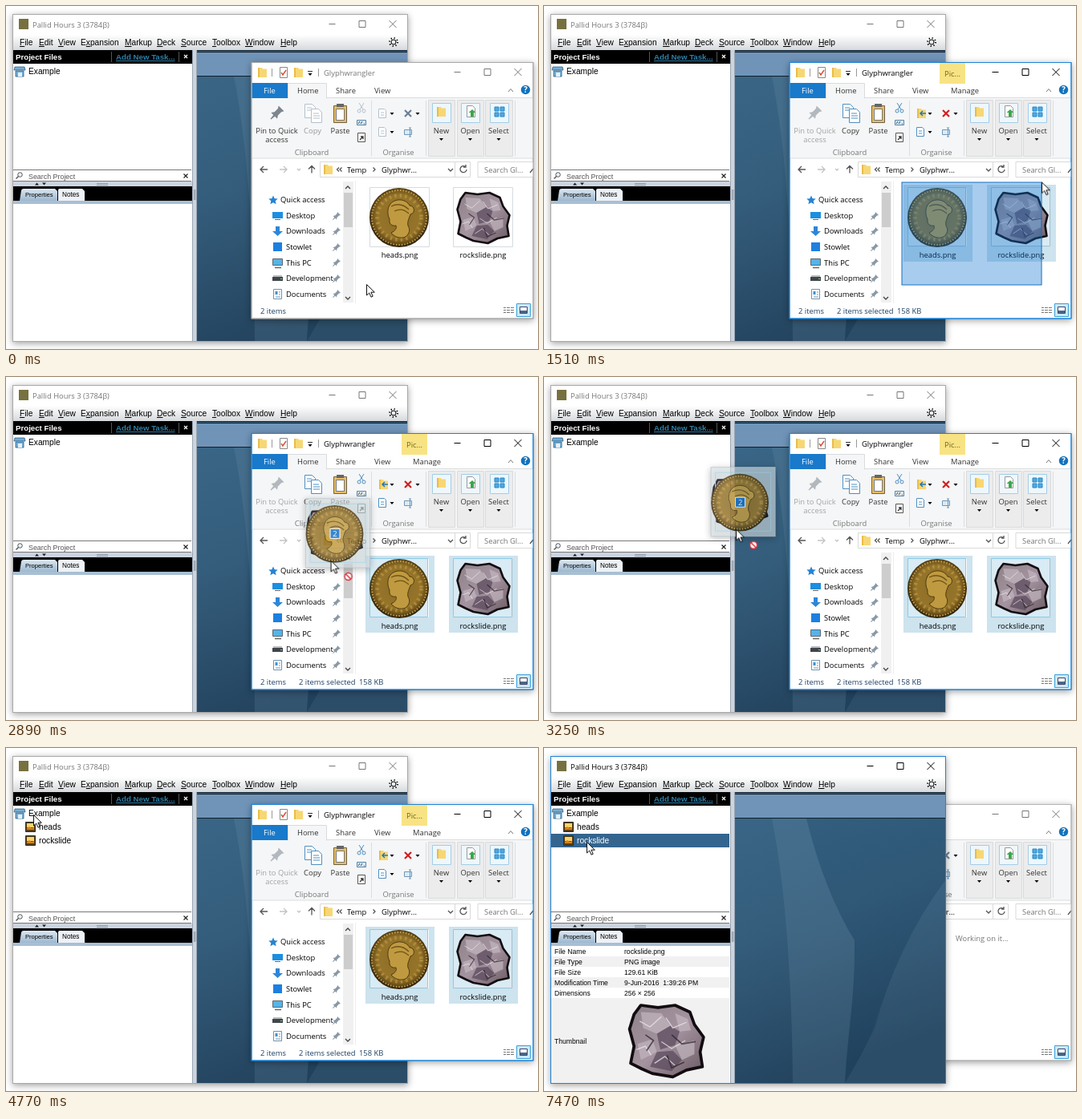
An HTML page for the animation above (8000 ms loop, 663 by 428 pixels).

```html
<!DOCTYPE html>
<html lang="en">
<head>
<meta charset="utf-8">
<title>Dragging files into a project</title>
<style>
html, body { margin: 0; width: 100%; height: 100%; overflow: hidden; background: #fff; }
svg { position: absolute; left: 0; top: 0; width: 663px; height: 428px; }
text { fill: currentColor; white-space: pre; }
.ui { font: 9.4px "Open Sans", "Noto Sans", sans-serif; }
.app { font: 10.2px "Liberation Sans", Arial, sans-serif; }
.bold { font-weight: bold; font-size: 9.7px; }
.small { font-size: 8.6px; }
.mid { text-anchor: middle; }
.line { fill: none; stroke: currentColor; }
.shadow { filter: drop-shadow(0 2px 4px rgba(0,0,0,.38)); }

/* one loop = 8 s, so 1% = 80 ms */
#app { z-index: 1; }
#explorer { z-index: 2; animation: depth 8s step-end infinite; }
#pointer { z-index: 3; }
@keyframes depth { 0% { z-index: 2 } 70% { z-index: 0 } }

.app-ink, .app-edge, .exp-ink, .exp-edge, .pre, .picked, .tab, .one, .two, .heads-on, .rock-on,
.list, .busy, .drop, .added, .row1, .row2, .info1, .info2, .ghost, .no { animation: 8s step-end infinite; }

.app-ink { animation-name: app-ink }
.app-edge { animation-name: app-edge }
.exp-ink { animation-name: exp-ink }
.exp-edge { animation-name: exp-edge }
@keyframes app-ink { 0% { color: #777 } 70% { color: #000 } }
@keyframes app-edge { 0% { stroke: #a9a9a9 } 70% { stroke: #1b84d8 } }
@keyframes exp-ink { 0% { color: #777 } 2.5% { color: #000 } 70% { color: #777 } }
@keyframes exp-edge { 0% { stroke: #a9a9a9 } 2.5% { stroke: #1b84d8 } 70% { stroke: #b4b4b4 } }

.pre { animation-name: pre }
.picked { animation-name: picked }
.tab { animation-name: tab }
.one { animation-name: one }
.two { animation-name: two }
.heads-on { animation-name: heads-on }
.rock-on { animation-name: two }
.list { animation-name: list }
.busy { animation-name: busy }
.drop { animation-name: drop }
.added { animation-name: added }
.row1 { animation-name: row1 }
.row2 { animation-name: row2 }
.info1 { animation-name: info1 }
.info2 { animation-name: info2 }
.ghost { animation-name: ghost }
.no { animation-name: no }
@keyframes pre { 0% { opacity: 1 } 11% { opacity: 0 } 75.5% { opacity: 1 } }
@keyframes picked { 0% { opacity: 0 } 11% { opacity: 1 } 75.5% { opacity: 0 } }
@keyframes tab { 0% { opacity: 0 } 10.2% { opacity: 1 } 75.5% { opacity: 0 } }
@keyframes one { 0% { opacity: 0 } 11% { opacity: 1 } 14% { opacity: 0 } }
@keyframes two { 0% { opacity: 0 } 14% { opacity: 1 } 70% { opacity: 0 } }
@keyframes heads-on { 0% { opacity: 0 } 9.7% { opacity: 1 } 70% { opacity: 0 } }
@keyframes list { 0% { opacity: 1 } 70% { opacity: 0 } }
@keyframes busy { 0% { opacity: 0 } 70% { opacity: 1 } }
@keyframes drop { 0% { opacity: 0 } 49.2% { opacity: 1 } 59.6% { opacity: 0 } }
@keyframes added { 0% { opacity: 0 } 59.6% { opacity: 1 } }
@keyframes row1 { 0% { opacity: 0 } 78.3% { opacity: 1 } 92.1% { opacity: 0 } }
@keyframes row2 { 0% { opacity: 0 } 92.1% { opacity: 1 } }
@keyframes info1 { 0% { opacity: 0 } 79.2% { opacity: 1 } 93.3% { opacity: 0 } }
@keyframes info2 { 0% { opacity: 0 } 93.3% { opacity: 1 } }
@keyframes ghost { 0% { opacity: 0 } 33.5% { opacity: .84 } 59.6% { opacity: 0 } }
@keyframes no { 0% { opacity: 0 } 33.5% { opacity: 1 } 49.2% { opacity: 0 } }

.band { x: 446px; animation: band 8s linear infinite, band-on 8s step-end infinite; }
@keyframes band-on { 0% { opacity: 0 } 3% { opacity: 1 } 24.7% { opacity: 0 } }
@keyframes band {
  0%, 2.5% { y: 348px; width: 0; height: 0 }
  5.6% { y: 341px; width: 10px; height: 7px }
  10.25% { y: 310px; width: 54px; height: 38px }
  18.875% { y: 220px; width: 174px; height: 128px }
  20.4% { y: 220px; width: 181px; height: 128px }
  22.25%, 100% { y: 220px; width: 197px; height: 128px }
}
#arrow { animation: travel 8s linear infinite; }
@keyframes travel {
  0% { transform: translate(449px,347px) }
  2.5% { transform: translate(446px,347px) }
  5.6% { transform: translate(456px,341px) }
  10.25% { transform: translate(500px,310px) }
  18.875% { transform: translate(620px,219.5px) }
  20.4% { transform: translate(627px,219.5px) }
  22.25% { transform: translate(643px,219.5px) }
  24.5% { transform: translate(643px,220px); animation-timing-function: ease-in-out }
  31.5%, 33.5% { transform: translate(483px,246px) }
  36.125% { transform: translate(405px,229px) }
  43.25% { transform: translate(143px,167px) }
  45.125% { transform: translate(66px,138px); animation-timing-function: ease-out }
  49.625% { transform: translate(34px,83px) }
  65.6% { transform: translate(34px,83px); animation-timing-function: ease-in-out }
  70.2% { transform: translate(139px,123px) }
  72.3% { transform: translate(139px,123px); animation-timing-function: ease-in-out }
  78% { transform: translate(48px,98px) }
  83.6% { transform: translate(48px,98px); animation-timing-function: ease-in-out }
  87.1%, 100% { transform: translate(53px,117px) }
}
</style>
</head>
<body>
<svg id="app" viewBox="0 0 663 428">
  <defs>
    <linearGradient id="sea" x2=".25" y2="1"><stop stop-color="#3b6788"/><stop offset=".5" stop-color="#345d7b"/><stop offset="1" stop-color="#24445f"/></linearGradient>
    <linearGradient id="bar" x2="0" y2="1"><stop stop-color="#fff"/><stop offset="1" stop-color="#d6d9dc"/></linearGradient>
    <linearGradient id="tabFill" x2="0" y2="1"><stop stop-color="#dce7f1"/><stop offset="1" stop-color="#9db8cf"/></linearGradient>
    <radialGradient id="gold" cx=".5" cy=".48"><stop stop-color="#8a6a25"/><stop offset=".72" stop-color="#96752a"/><stop offset=".9" stop-color="#6d5119"/><stop offset="1" stop-color="#33260c"/></radialGradient>
    <linearGradient id="stone" x2="1" y2="1"><stop stop-color="#8e8187"/><stop offset=".5" stop-color="#a493a0"/><stop offset="1" stop-color="#6a5a62"/></linearGradient>
    <g id="coin">
      <circle r="37" fill="url(#gold)"/>
      <circle r="34" fill="none" stroke="#c5a04a" stroke-width="2" stroke-dasharray="1.5 2"/>
      <circle r="27.5" fill="none" stroke="#bf9a45" stroke-width="4.5" stroke-dasharray="2.5 4" opacity=".65"/>
      <path d="M-11-17C-4-25 9-23 13-15C19-15 21-6 14-4C12 2 10 5 11 10C14 15 13 20 8 24C1 27-6 24-10 19C-4 16-3 13-4 10C-9 11-13 8-12 2C-15-4-15-12-11-17Z" fill="#c09a40" stroke="#4e3a12"/>
      <path d="M-10-14Q2-20 12-10M-6-8Q4-13 12-5" fill="none" stroke="#705419" stroke-width="1.3"/>
    </g>
    <g id="rock">
      <path d="M-22-31L-7-29 8-31 21-25 25-14 33-3 30 10 32 23 18 26 6 32-12 29-21 25-31 20-28 5-32-10-28-23Z" fill="url(#stone)" stroke="#120c10" stroke-width="2.6" stroke-linejoin="round"/>
      <path d="M-22-25L-4-24 4-13-8-6-20-11ZM8-24L19-19 22-9 12-8ZM-25 3L-12-1-8 10-22 17ZM8 4L25 0 25 12 14 17Z" fill="#c4b7bf" opacity=".7"/>
      <path d="M-8-6L4-13 12-8 8 4-5 8ZM-8 10L6 9 14 17 5 27-14 23Z" fill="#59485a" opacity=".7"/>
      <path d="M-23-17l9 5 10-9M0-20l6 9 12-5M-26 8l8-3 5 8M-4 1l9 6 12-7M-10 20l9-6 9 8" fill="none" stroke="#f0e9ee" stroke-width=".9" opacity=".75"/>
      <path d="M-18-5l7 5-6 9M5-5l9 8 12-2M1 13l4 11 11-5" fill="none" stroke="#2b2028" stroke-width="1.2" opacity=".7"/>
    </g>
    <g id="image"><path d="M.5.5h12v12H.5z" fill="#57401b" stroke="#2f2c2a"/><path d="M2 2h9v5H2z" fill="#f7d56a"/><path d="M2 8l3-2 3 2 3-1v3H2z" fill="#d9821f"/></g>
    <g id="folder"><path d="M0 1h5l1 1.5h5V13H0z" fill="#f7d774"/><path d="M0 1h2v12H0z" fill="#e9bd48"/></g>
    <g id="caps" class="line"><path d="M0 4.5h8"/><path d="M37.5.5h8v8h-8zM75 0l9 9M84 0l-9 9"/></g>
  </defs>
  <rect class="app-edge shadow" x="8.5" y="10.5" width="492" height="408" fill="#fff"/>
  <rect x="16" y="16" width="12" height="13" fill="#77713f"/>
  <g class="app-ink">
    <text class="ui" x="33" y="27">Pallid Hours 3 (3784β)</text>
    <use href="#caps" x="402.500" y="18"/>
  </g>
  <path d="M9 36h491v19H9z" fill="url(#bar)"/>
  <g class="app" id="menu"><text x="17" y="49"><tspan text-decoration="underline">F</tspan>ile</text><text x="41" y="49"><tspan text-decoration="underline">E</tspan>dit</text><text x="65" y="49"><tspan text-decoration="underline">V</tspan>iew</text><text x="93" y="49">E<tspan text-decoration="underline">x</tspan>pansion</text><text x="148" y="49"><tspan text-decoration="underline">M</tspan>arkup</text><text x="188" y="49"><tspan text-decoration="underline">D</tspan>eck</text><text x="218" y="49"><tspan text-decoration="underline">S</tspan>ource</text><text x="257" y="49"><tspan text-decoration="underline">T</tspan>oolbox</text><text x="298" y="49"><tspan text-decoration="underline">W</tspan>indow</text><text x="342" y="49"><tspan text-decoration="underline">H</tspan>elp</text></g>
  <circle cx="483" cy="45" r="3" class="line"/><circle cx="483" cy="45" r="5" class="line" stroke-width="2" stroke-dasharray="1.2 2.727"/>

  <path d="M238 55h262v363H238z" fill="url(#sea)"/>
  <path d="M284 88Q308 210 310 418H375C380 340 388 310 387 240Q350 180 327 88Z" fill="#7ba0b8" opacity=".17"/>
  <path d="M327 88H500V165Q445 240 410 350Q390 395 375 418C380 340 388 310 387 240Q350 180 327 88Z" fill="#0a3550" opacity=".12"/>
  <path d="M500 165V418H375Q395 385 412 350Q440 245 500 165Z" fill="#7399b5" opacity=".1"/>
  <path d="M238 57h262v30H238z" fill="#7094b8"/>
  <path d="M238 55.500h262M238 57.500h262M238 87.500h262" stroke="#10202c"/>

  <path d="M9 55h223v17H9z"/>
  <path d="M131.500 57v13M215.500 57v13" stroke="#555"/>
  <g class="app bold"><text x="12" y="67" style="color:#fff">Project Files</text><text x="137" y="67" style="color:#2f7ea6" text-decoration="underline">Add New Task...</text></g>
  <path d="M222 61l4 4m0-4l-4 4" stroke="#fff" stroke-width="1.200"/>
  <g class="app">
    <g class="drop"><path d="M9 73h222v17H9z" fill="#34658f"/></g>
    <path d="M11 76h12l1 4H10zM12 81h10v7H12z" fill="#74aed6" stroke="#2c5e85" stroke-width=".8"/><path d="M15 83h5v5h-5z" fill="#e5f0f7"/>
    <text x="28" y="85">Example</text>
    <text x="28" y="85" class="drop" style="color:#fff">Example</text>
    <g class="added"><text x="41" y="102">heads</text><text x="41" y="119">rockslide</text></g>
    <g class="row1" style="color:#fff"><path d="M9 90h222v17H9z" fill="#34658f"/><text x="41" y="102">heads</text></g>
    <g class="row2" style="color:#fff"><path d="M9 107h222v17H9z" fill="#34658f"/><text x="41" y="119">rockslide</text></g>
    <g class="added"><use href="#image" x="24" y="92"/><use href="#image" x="24" y="109"/></g>
  </g>
  <path d="M9 204.500h222M9 218.500h222" stroke="#777"/>
  <circle cx="17.500" cy="210.500" r="2.800" fill="#e8f1f7" stroke="#555"/><path d="M15.500 212.500l-3 3" stroke="#555" stroke-width="1.500"/>
  <text class="app" x="28" y="215.500" style="font-size:8.9px;color:#555">Search Project</text>
  <path d="M221.500 209.500l5 5m0-5l-5 5" stroke="#222" stroke-width="1.200"/>
  <path d="M9 219h223v6H9zM232 55h6v363h-6z" fill="#cbd4df"/>
  <path d="M232.500 55v363M237.500 55v363" stroke="#9ba6b2"/>
  <path d="M36 223.500l2.500-3 2.500 3zM45 220.500h5l-2.500 3z" fill="#222"/>
  <path d="M113 221.500h14M113 223.500h14M234.500 229v13M236 229v13" stroke="#8e9aa8"/>
  <path d="M9 225h223v18H9z"/>
  <path d="M17 243l2-13q.5-2 3-2h39l3 3v12z" fill="url(#tabFill)"/><path d="M65 243v-13q0-2 2-2h28l3 3v12z" fill="#eef2f6"/>
  <path d="M9 243h223v4H9z" fill="#a9bfd3"/>
  <g class="app"><text x="24" y="238" style="font-size:7.6px">Properties</text><text x="70" y="238" style="font-size:8.200px">Notes</text></g>
  <g class="app small">
    <g id="fields" class="info1">
      <path d="M9 260h222v13H9zM9 286h222v13H9zM9 312h222v106H9z" fill="#f1f1f1"/>
      <text x="13" y="257">File Name</text><text x="13" y="270">File Type</text><text x="13" y="283">File Size</text><text x="13" y="296">Modification Time</text><text x="13" y="309">Dimensions</text><text x="13" y="369">Thumbnail</text>
      <text x="100" y="270">PNG image</text><text x="100" y="309">256 × 256</text>
    </g>
    <g class="info1"><text x="100" y="257">heads.png</text><text x="100" y="283">28.47 KiB</text><text x="100" y="296">9-Jun-2016  1:39:08 PM</text><use href="#coin" transform="translate(152 365) scale(1.28)"/></g>
    <g class="info2">
      <path d="M9 260h222v13H9zM9 286h222v13H9zM9 312h222v106H9z" fill="#f1f1f1"/>
      <text x="13" y="257">File Name</text><text x="13" y="270">File Type</text><text x="13" y="283">File Size</text><text x="13" y="296">Modification Time</text><text x="13" y="309">Dimensions</text><text x="13" y="369">Thumbnail</text>
      <text x="100" y="257">rockslide.png</text><text x="100" y="270">PNG image</text><text x="100" y="283">129.61 KiB</text><text x="100" y="296">9-Jun-2016  1:39:26 PM</text><text x="100" y="309">256 × 256</text>
      <use href="#rock" transform="translate(152 365) scale(1.42)"/>
    </g>
  </g>
  <path class="app-edge" d="M8.500 10.500h492v408h-492z" fill="none"/>
</svg>

<svg id="explorer" class="ui" viewBox="0 0 663 428">
  <defs>
    <path id="down" d="M-2.500-1h5L0 2z"/>
    <g id="pin"><path d="M1-5l4 4-2 .5L.5 2 0 4.500-1.700 2.800-4.500 5-5 4.500-2.800 1.700-4.500 0-2-.5.500-3z"/></g>
    <g id="pages"><path d="M.5.500h9l4 4v13H.500z" fill="#fff" stroke="currentColor"/><path d="M8.500 6.500h9l4 4v13h-13z" fill="#fff" stroke="currentColor"/><path d="M3 5h6M3 8h5M11 12h7M11 15h8M11 18h8" stroke="currentColor"/></g>
    <g id="cut" class="line"><path d="M-3-6L2 2M3-6L-2 2"/><circle cx="-3" cy="4" r="2"/><circle cx="3" cy="4" r="2"/></g>
    <g id="sheet"><path d="M-4.500-5.500h7l2 2v9h-9z" fill="#fff" stroke="currentColor"/><path d="M-2-1h4M-2 2h4" stroke="currentColor"/></g>
  </defs>
  <rect class="exp-edge shadow" x="306" y="70.500" width="351" height="319.500" fill="#fff"/>
  <g class="tab"><path d="M493 71h32v26h-32z" fill="#f8e384"/><text x="499" y="88" style="color:#6f621c">Pic...</text></g>
  <use href="#folder" x="314" y="76"/><use href="#folder" x="359" y="76"/>
  <path d="M331.500 78v10M389.500 78v10" stroke="#999"/>
  <path d="M341.500 76.500h9v13h-9z" fill="#fff" stroke="#888"/><path d="M343 83l2 3 4-6" fill="none" stroke="#d9502e" stroke-width="1.500"/>
  <path d="M376 81.500h6" stroke="#333"/><use href="#down" x="379" y="85"/>
  <g class="exp-ink"><text x="396" y="87">Glyphwrangler</text><use href="#caps" x="558.500" y="78"/></g>

  <path d="M306.500 115h350v75h-350z" fill="#f5f6f7"/><path d="M306.500 114.500h350M306.500 190h350" stroke="#dadbdc"/>
  <path d="M306.500 96h45v19h-45z" fill="#1979ca"/><path d="M351.500 115.500V96.500h48v19" fill="#f5f6f7" stroke="#dadbdc"/><path d="M352 115h47" stroke="#f5f6f7" stroke-width="2"/>
  <g style="color:#333"><text x="321" y="109" style="color:#fff">File</text><text x="363" y="109">Home</text><text x="411" y="109">Share</text><text x="459" y="109">View</text><text x="507" y="109" class="tab">Manage</text></g>
  <path d="M626 107l3-3.500 3 3.500" fill="none" stroke="#777"/><circle cx="647.500" cy="104.500" r="5.700" fill="#1272bd"/><text class="mid bold" x="647.500" y="108" style="color:#fff">?</text>
  <path d="M455.500 118v69M523.500 118v69M634.500 118v69" stroke="#dcdddf"/>

  <g class="mid" style="color:#333">
    <g class="pre"><use href="#pin" transform="translate(338 133) scale(1.700)" fill="#7d858e"/><text x="337.500" y="159">Pin to Quick</text><text x="337.500" y="170">access</text>
      <g style="color:#b4c0cc"><use href="#pages" x="372" y="122"/><use href="#cut" x="443" y="127"/><text x="382" y="159" style="color:#999">Copy</text><use href="#sheet" x="469" y="134"/><use href="#sheet" x="469" y="157"/></g>
      <path d="M497 130l8 8m0-8l-8 8" stroke="#6c7f98" stroke-width="2.200"/></g>
    <g class="picked"><g style="color:#a2a2a2"><use href="#pin" transform="translate(338 133) scale(1.700)" fill="#b3b8be"/><text x="337.500" y="159">Pin to Quick</text><text x="337.500" y="170">access</text></g>
      <g style="color:#4f8fc0"><use href="#pages" x="372" y="122"/><use href="#cut" x="443" y="127"/><use href="#sheet" x="469" y="157"/></g><text x="382" y="159">Copy</text>
      <use href="#folder" x="465" y="127"/><path d="M476 134h-7m3-3l-3 3 3 3" fill="none" stroke="#2377b8" stroke-width="1.500"/>
      <path d="M497 130l8 8m0-8l-8 8" stroke="#d01f1f" stroke-width="2.200"/></g>
    <path d="M408.500 124.500h16v21h-16z" fill="#e7bd63" stroke="#6f6347"/><path d="M412 122h9v4h-9z" fill="#666"/><path d="M411.500 128.500h10v14h-10z" fill="#fff" stroke="#777"/>
    <text x="416.500" y="159">Paste</text>
    <path d="M437.500 142.500h11v6h-11z" fill="#d9ecf7" stroke="#5684a8"/><path d="M439 147l2-3m1 3l2-3m2 3h1" stroke="#444"/>
    <path d="M438.500 158.500h9v11h-9z" fill="#fff" stroke="#555"/><path d="M441 167l4-4m-3 0h3v3" class="line" stroke-width="1.300"/>
    <path d="M496.500 154.500h9v6h-9zM503.500 152v11M502 152h3M502 163h3" fill="#dbeaf5" stroke="#6f98ba"/>
    <use href="#down" x="481" y="134"/><use href="#down" x="481" y="157"/><use href="#down" x="513" y="134"/>
    <g style="color:#777"><text x="381" y="186">Clipboard</text><text x="489" y="186">Organise</text></g>
    <path d="M526.500 117.500h33v70h-33zM562.500 117.500h33v70h-33zM597.500 117.500h34v70h-34z" fill="#ececed" stroke="#d9dadb"/>
    <path d="M531.500 121.500h23v24h-23zM567.500 121.500h23v24h-23zM603.500 121.500h23v24h-23z" fill="#eef7fc" stroke="#a4cde6"/>
    <use href="#folder" x="537" y="125"/>
    <path d="M574.500 124.500h7l3 3v11h-10z" fill="#fff" stroke="#999"/><path d="M579 138v-5h-2.500l4.500-4 4.500 4H583v5z" fill="#38a84a"/>
    <path d="M609 126h5v5h-5zM616 126h5v5h-5zM609 133h5v5h-5zM616 133h5v5h-5z" fill="#4fa9e2" stroke="#2688c7"/>
    <text x="542.500" y="159">New</text><text x="578.500" y="159">Open</text><text x="614" y="159">Select</text>
    <use href="#down" x="542.500" y="166"/><use href="#down" x="578.500" y="166"/><use href="#down" x="614" y="166"/>
  </g>

  <path d="M391.500 194.500h168v19h-168zM559.500 194.500h19v19h-19zM657 194.500h-69v19h69" fill="#fff" stroke="#d9d9d9"/>
  <g class="line" style="color:#555" stroke-width="1.300"><path d="M326 204h-9m4-4l-4 4 4 4M381 208.500v-9m-4 4l4-4 4 4M551 203l3 3 3-3M457.500 201.500l2.500 2.500-2.500 2.500M415 201.500l-2.500 2.500 2.500 2.500m3.500-5L416 204l2.500 2.500"/><path d="M341 204h9m-4-4l4 4-4 4M363 203l2 2 2-2" stroke="#c3c3c3"/><path d="M573 201a4 4 0 1 0 1 3m-1-6v3h-3M657 203l-4 5"/></g>
  <use href="#folder" x="396" y="197"/>
  <text x="425" y="207.500">Temp</text><text x="468" y="207.500">Glyphwr...</text><text x="596" y="207.500" style="color:#777">Search Gl...</text>

  <path d="M333 236.500l1.700 3.700 4 .4-3 2.700.9 4-3.600-2-3.600 2 .9-4-3-2.700 4-.4z" fill="#2583d4"/>
  <path d="M332 257h13v8h-13z" fill="#1d8ee0"/><path d="M335 266.500h7" stroke="#666"/>
  <path d="M336 275h5v6h4l-6.500 6-6.500-6h4z" fill="#2d86d8"/>
  <path d="M333 295h11v11h-11z" fill="#1d7fe0"/>
  <path d="M332.500 315.500h12v8h-12z" fill="#54b4ea" stroke="#5a6873"/><path d="M335 326.500h8" stroke="#666" stroke-width="1.500"/>
  <path d="M332 338h13v5h-13z" fill="#3f454b"/><path d="M333 336h11v2h-11z" fill="#bbb"/><path d="M342 340.500h2" stroke="#6fe36f"/>
  <path d="M333.500 353.500h10v12h-10z" fill="#fff" stroke="#7193ad"/><path d="M335.500 356h3v4h-3z" fill="#3f90cc"/><path d="M340 357h2m-2 3h2m-6 3h6" stroke="#6797bb"/>
  <text x="342" y="245">Quick access</text><text x="349" y="265">Desktop</text><text x="349" y="284">Downloads</text><text x="349" y="304">Stowlet</text><text x="349" y="323.500">This PC</text><text x="349" y="343">Development</text><text x="349" y="363">Documents</text>
  <g fill="#8998a5"><use href="#pin" x="412" y="262"/><use href="#pin" x="412" y="281"/><use href="#pin" x="412" y="301"/><use href="#pin" x="412" y="320"/><use href="#pin" x="412" y="340"/><use href="#pin" x="412" y="359"/></g>
  <path d="M420 219h13v151h-13z" fill="#f0f0f0"/><path d="M421 233h11v43h-11z" fill="#cdcdcd"/><path d="M423 228l3-3 3 3M423 363l3 3 3-3" fill="none" stroke="#444" stroke-width="1.300"/><path d="M435.500 218v153" stroke="#eee"/>

  <g class="list">
    <path class="heads-on" d="M448 223h86v96h-86z" fill="#cde3ee"/><path class="rock-on" d="M552 223h86v96h-86z" fill="#cde3ee"/>
    <g fill="#fff" stroke="#d5dbe0"><path id="card" d="M453.500 226.500h74v74h-74z"/><use href="#card" x="104"/></g>
    <path class="heads-on" d="M453.500 226.500h72v73h-72z" fill="#d9ebf4" stroke="#8ccbe6"/><path class="rock-on" d="M557.500 226.500h73v73h-73z" fill="#d9ebf4" stroke="#8ccbe6"/>
    <use href="#coin" x="490" y="264"/><use href="#rock" x="594.500" y="264"/>
    <g class="mid"><text x="490.500" y="314">heads.png</text><text x="594.500" y="314">rockslide.png</text></g>
    <rect class="band" fill="#0f72cc" fill-opacity=".36" stroke="#1673c4"/>
  </g>
  <text class="busy" x="513" y="241" style="color:#777">Working on it...</text>

  <g style="color:#1c3f63"><text x="317" y="384">2 items</text><text class="one" x="365" y="384">1 item selected  28.4 KB</text><g class="two"><text x="365" y="384">2 items selected</text><text x="440" y="384">158 KB</text></g></g>
  <path d="M620 376.500h3m1 0h4m1 0h4m-13 3h3m1 0h4m1 0h4m-13 3h3m1 0h4m1 0h4" stroke="#777"/>
  <path d="M636.500 371.500h17v16h-17z" fill="#cce8f7" stroke="#3aa0d8"/><path d="M640.500 375.500h9v8h-9z" fill="#fff" stroke="#446"/><path d="M641 380h8v3h-8z" fill="#456b8c"/>
  <path class="exp-edge" d="M306 70.500h351v319.500h-351z" fill="none"/>
</svg>

<svg id="pointer" class="ui" viewBox="0 0 663 428">
  <g id="arrow">
    <g class="ghost">
      <rect x="-31" y="-77" width="80" height="86" fill="#dbe6eb" fill-opacity=".72" stroke="#b9c4ca" class="shadow"/>
      <use href="#rock" transform="translate(4 -34) rotate(-9)"/>
      <path d="M-25.500-70.500h69v73h-69z" fill="none" stroke="#a8d1e2"/>
      <use href="#coin" transform="translate(5 -33) scale(.97)"/>
      <path d="M-.5-39.500h12v12h-12z" fill="#1673c9" stroke="#fff"/><text class="mid" x="5.500" y="-30" style="color:#fff">2</text>
    </g>
    <g class="no"><circle cx="22" cy="20" r="4.500" fill="#fff" stroke="#d6303a" stroke-width="1.500"/><path d="M19 17l6 6" stroke="#d6303a" stroke-width="1.500"/></g>
    <path d="M.5.500v13.500l3.200-3 2.300 5.200 2.200-1-2.300-5h4.400z" fill="#fff" stroke="#111"/>
  </g>
</svg>
</body>
</html>
```
